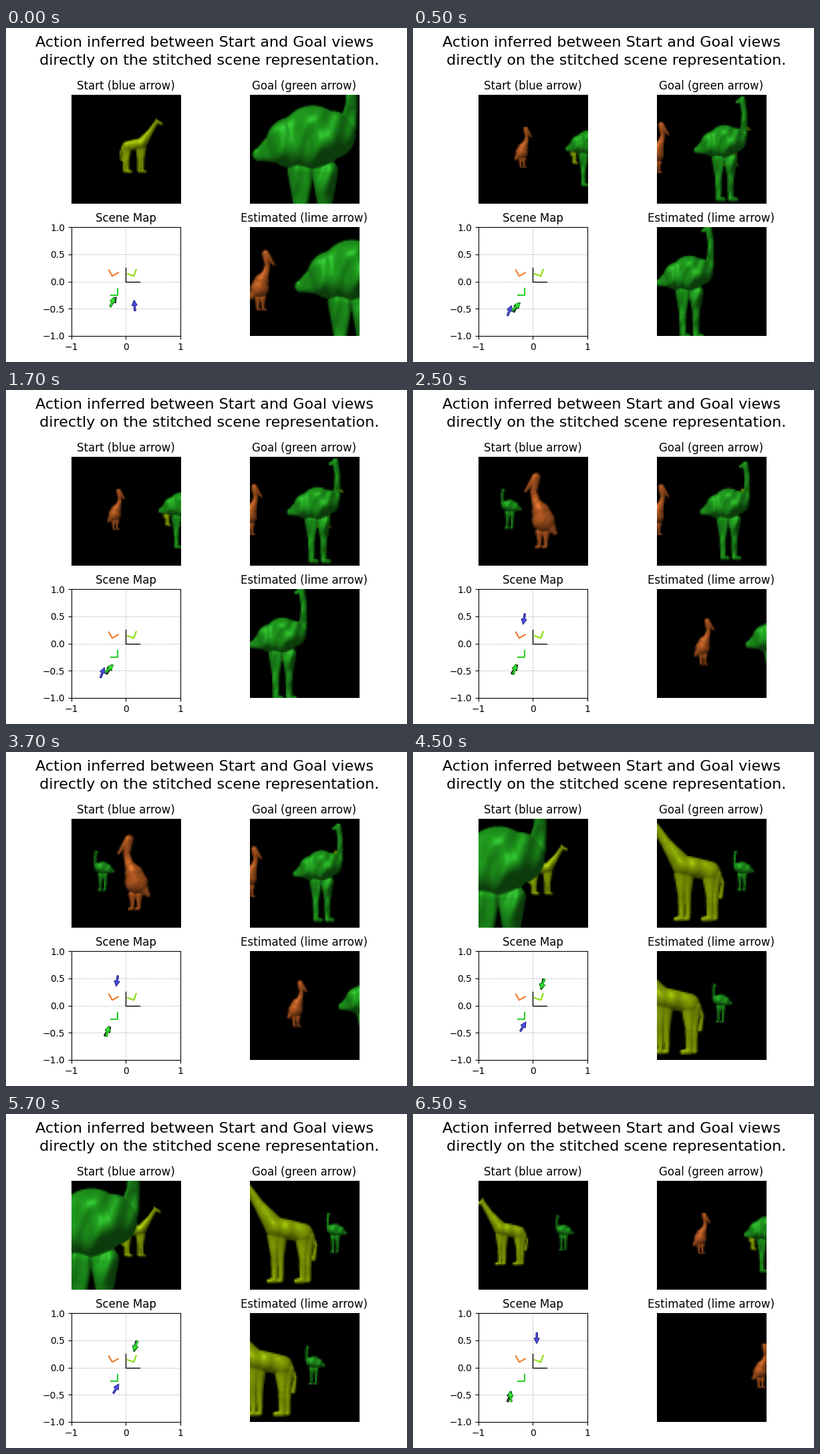
Recreate the animation shown at these times as a matplotlib script. Size 600 px wide and 500 px high, loop 8000 ms.

```python
import numpy as np
import matplotlib.pyplot as plt
from matplotlib.animation import FuncAnimation

W, H = 600, 500
PANEL_W, PANEL_H = 163.2, 162.9
RES, SUPER = 64, 4
FOCAL, HORIZON, EYE = 176, 76, 21.7
ARROW, PIVOT = 0.2, 0.11


def leg(x, top, r):
    return [(x, top, r), (x, 0.55 * top, 0.5 * r), (x, 3, 0.4 * r), (x + 0.8 * r, 2, 0.3 * r)]


# Animals face right, feet at the origin; each chain is a path of (x, height, radius) balls.
OSTRICH = [
    [(-36, 75, 5), (-12, 84, 19), (4, 88, 24), (18, 90, 18), (30, 96, 7),
     (33, 112, 4.5), (33, 130, 4), (30, 150, 4.5), (22, 146, 2)],
    leg(-5, 62, 10), leg(13, 62, 10),
]
GIRAFFE = [
    [(50, 88, 2), (41, 92, 3.5), (30, 75, 5), (14, 53, 10), (2, 51, 9.5), (-12, 48, 9)],
    [(41, 91, 2), (40, 97, 1.2)],
    [(-19, 50, 2), (-24, 36, 1.5), (-22, 23, 2)],
    leg(15, 44, 7), leg(9, 44, 6), leg(-12, 44, 8), leg(-17, 44, 6),
]
PELICAN = [
    [(21, 71, 1.5), (8, 88, 5.5), (11, 70, 4), (8, 58, 5.5), (2, 46, 11), (-1, 35, 14),
     (-15, 20, 3)],
    leg(-4, 20, 5), leg(4, 20, 5),
]
# chains, colour, surface roughness, size, place on the map, marker angle, marker colour
ANIMALS = [
    (OSTRICH, (34, 168, 32), 0.9, 0.265, (-0.15, -0.25), 90, "#28d028"),
    (GIRAFFE, (150, 182, 4), 0.3, 0.44, (0.145, 0.1), 70, "#88dd08"),
    (PELICAN, (196, 98, 36), 0.35, 0.425, (-0.25, 0.1), 30, "#f07828"),
]
# Start, goal and estimated camera of each scene: x, y, heading in degrees.
CAMERAS = [
    [(0.157, -0.43, 95), (-0.225, -0.36, 57), (-0.245, -0.365, 70)],
    [(-0.425, -0.525, 69), (-0.3, -0.465, 60), (-0.295, -0.45, 42)],
    [(-0.165, 0.44, 260.5), (-0.33, -0.465, 57), (-0.332, -0.462, 77.5)],
    [(-0.175, -0.378, 60), (0.17, 0.38, 258), (0.172, 0.385, 248)],
    [(0.07, 0.53, 269), (-0.425, -0.525, 69), (-0.41, -0.52, 98)],
]


def direction(degrees):
    return np.cos(np.radians(degrees)), np.sin(np.radians(degrees))


def relief(chains, x, y):
    """Height of a soft union of tapered capsules."""
    total = np.zeros_like(x)
    for chain in chains:
        for (x0, y0, r0), (x1, y1, r1) in zip(chain, chain[1:]):
            ux, uy = x1 - x0, y1 - y0
            t = np.clip(((x - x0) * ux + (y - y0) * uy) / (ux * ux + uy * uy), 0, 1)
            gap = (x - x0 - t * ux) ** 2 + (y - y0 - t * uy) ** 2
            total += np.maximum((r0 + t * (r1 - r0)) ** 2 - gap, 0) ** 4
    return total ** (1 / 8)


def lumps(x, y):
    """Random smooth bumps with the same steepness at every wavelength."""
    rng = np.random.default_rng(4)
    total = np.zeros_like(x)
    for k in np.linspace(0.1, 0.5, 9):
        c, s = direction(rng.uniform(0, 360))
        total += 0.28 / k * np.sin(k * (c * x + s * y) + rng.uniform(0, 6.3))
    return total


def render(camera):
    """View of the map from a camera, nearest animal drawn last."""
    cx, cy, heading = camera
    fx, fy = direction(heading)
    n = RES * SUPER
    step = PANEL_W / n
    py, px = (np.mgrid[:n, :n] + 0.5) * step
    canvas = np.zeros((n, n, 3))
    seen = []
    for chains, color, rough, size, (ax, ay), *_ in ANIMALS:
        depth = (ax - cx) * fx + (ay - cy) * fy
        side = (ax - cx) * fy - (ay - cy) * fx
        if depth > 0.05:
            seen.append((depth, side, chains, np.array(color) / 255, rough, size))
    for depth, side, chains, color, rough, size in sorted(seen, key=lambda s: -s[0]):
        scale = size / depth
        x = (px - PANEL_W / 2 - FOCAL * side / depth) / scale * np.sign(fy)
        y = (HORIZON + EYE / depth - py) / scale
        height = relief(chains, x, y)
        mask = height > 0
        gy, gx = np.gradient(height + rough * lumps(x, y), step / scale)
        facing = (0.25 * gx + 0.55 * gy + 0.8) / np.sqrt(gx ** 2 + gy ** 2 + 1)
        facing = np.clip(facing, 0, 1)[..., None]
        lit = color * (0.36 + 0.58 * facing) + 0.25 * facing ** 24 * (0.3 + 0.7 * color)
        canvas[mask] = lit[mask]
    small = canvas.reshape(RES, SUPER, RES, SUPER, 3).mean((1, 3))
    return np.clip(small, 0, 1)


def panel(left, top, title):
    ax = fig.add_axes([left / W, 1 - (top + PANEL_H) / H, PANEL_W / W, PANEL_H / H])
    ax.set_title(title, fontsize=12)
    return ax


def corner(x, y, degrees, size, color, width):
    c, s = direction(degrees)
    scene_map.plot([x + size * c, x, x - size * s], [y + size * s, y, y + size * c],
                   color=color, lw=width)


def make_arrow(face, edge):
    return scene_map.arrow(0, 0, 0, ARROW, width=0.03, head_width=0.1, head_length=0.1,
                           length_includes_head=True, fc=face, ec=edge, lw=0.8, zorder=3)


fig = plt.figure(figsize=(W / 100, H / 100), dpi=100, facecolor="white")
for baseline, line in [(28, "Action inferred between Start and Goal views "),
                       (55, " directly on the stitched scene representation.")]:
    fig.text(300.6 / W, 1 - baseline / H, line, fontsize=16, ha="center", va="baseline")

photos = []
for left, top, title in [(97.8, 100.1, "Start (blue arrow)"),
                         (364.8, 100.1, "Goal (green arrow)"),
                         (364.8, 298.1, "Estimated (lime arrow)")]:
    ax = panel(left, top, title)
    ax.axis("off")
    photos.append(ax.imshow(np.zeros((RES, RES, 3)), aspect="auto"))

scene_map = panel(97.8, 298.1, "Scene Map")
scene_map.set(xlim=(-1, 1), ylim=(-1, 1), xticks=[-1, 0, 1], yticks=np.linspace(-1, 1, 5))
scene_map.grid(ls="--", lw=0.5)
scene_map.set_axisbelow(True)
corner(0, 0, 0, 0.25, "black", 1)
for *_, place, angle, color in ANIMALS:
    corner(*place, angle, 0.125, color, 1.5)
arrows = [make_arrow("#4c4ce4", "#2c2c90"), make_arrow("#2c8c2c", "black"),
          make_arrow("#32e632", "#1c9c1c")]

pictures = [[render(camera) for camera in scene] for scene in CAMERAS]


def update(frame):
    scene = (frame + 3) // 4
    for photo, picture in zip(photos, pictures[scene]):
        photo.set_data(picture)
    for arrow, (x, y, heading) in zip(arrows, CAMERAS[scene]):
        c, s = direction(heading)
        arrow.set_data(x=x - PIVOT * c, y=y - PIVOT * s, dx=ARROW * c, dy=ARROW * s)
    return photos + arrows


anim = FuncAnimation(fig, update, frames=16, interval=500, repeat=True, repeat_delay=0)
plt.show()
```
